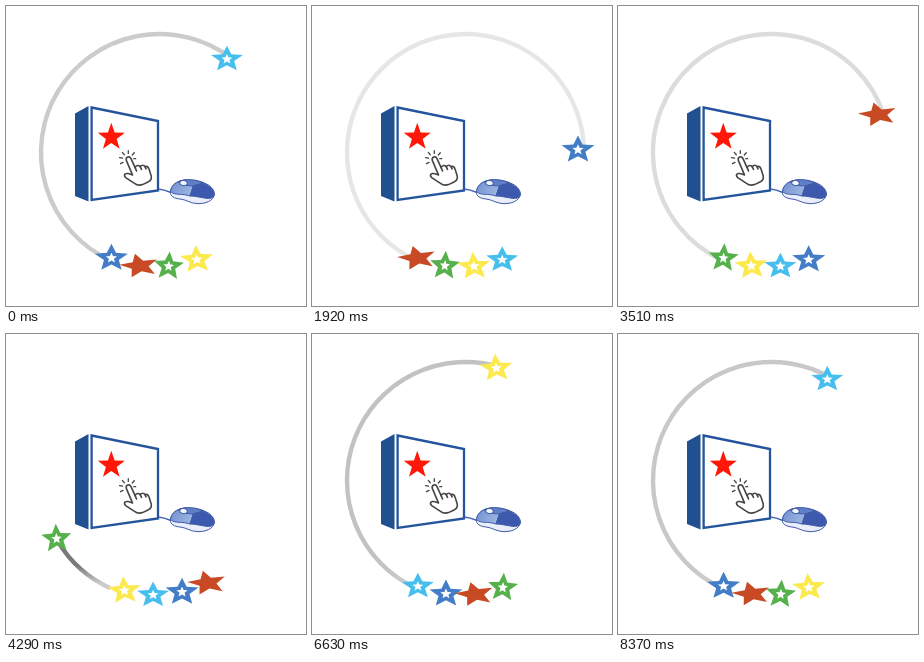
Write an HTML page that moves like this. It is 300 by 300 pixels and loops after 8.4 s.

```html
<!DOCTYPE html>
<html lang="en">
<head>
<meta charset="utf-8">
<title>Star carousel</title>
<style>
  html, body { margin: 0; width: 100%; height: 100%; overflow: hidden; background: #fff; }
  svg { display: block; width: 100%; height: 100%; }
</style>
</head>
<body>
<svg viewBox="0 0 300 300">
  <defs id="defs">
    <linearGradient id="shell" x2="1" y2=".4">
      <stop offset="0" stop-color="#6f8fd0"/>
      <stop offset="1" stop-color="#9db4e2"/>
    </linearGradient>
  </defs>

  <g id="trails" fill="none" stroke-width="4.400"/>

  <!-- box -->
  <path d="M69 107.500 82.500 100V195.500L69 190Z" fill="#20508f"/>
  <path d="M85.600 101.500 152 115V184.500L85.600 194Z" fill="#fff" stroke="#24559c" stroke-width="2.300"/>
  <path id="badge" fill="#ff1808" transform="translate(105.300 131.200)"/>

  <!-- hand -->
  <g transform="translate(0 -.6)" fill="none" stroke="#454545" stroke-width="1.600" stroke-linecap="round" stroke-linejoin="round">
    <path fill="#fff" d="M126.500 169.500 120.300 155Q119.700 152.300 121.800 151.600 124 151 125 153.200L129 162Q131.500 158.700 134.200 161.200 136.800 158.600 139 161.200 142 160 143.200 164.200L145.200 170.500Q146 174.500 142.500 176.300L136.500 179.200Q132 180.700 128.500 178L119.700 172.300Q117.700 170.500 119 168.600 120.500 167.200 126.500 169.500Z"/>
    <path d="M129 162 130.500 165.500M134.200 161.200 135.500 164M139 161.200 140 163.500"/>
    <path stroke-width="1.300" d="M114.500 158.300 117 157M113.500 152.300 116.500 152.800M116.300 147 118.300 149.300M122.300 145.300V148M128.300 147.300 126.300 149.600M129.700 153.300 127.800 153.300"/>
  </g>

  <!-- mouse -->
  <path d="M152 183Q158 183.500 165 186.500" fill="none" stroke="#3e62ae" stroke-width="1.500"/>
  <g stroke="#3f5ca6" stroke-width="1">
    <path fill="#e9eefa" d="M164.500 186C165 179 171 174.500 180 174 192 173.500 208 178 208.300 188 208 195 199 198 191 197.600 184 197.300 180 193.500 174 193 168 192.500 164 190 164.500 186Z"/>
    <path fill="url(#shell)" d="M164.500 185.500C165 179 171 174.500 180 174L188 178 184 190C176 187 169 190 164.500 185.500Z"/>
    <path fill="#3c59ae" d="M188 178C191 175.500 194 175 197 177 204 180 208.500 184 208.300 189 206 196 194 190 184 190Z"/>
    <path fill="#5f7fc6" d="M172 176C178 172.500 190 173 197 177L188 179.500Q181 181 172 176Z"/>
    <ellipse cx="177.500" cy="177" rx="3.800" ry="2.500" fill="#f4f7ff" transform="rotate(10 177.500 177)"/>
  </g>

  <g id="stars"/>
</svg>
<script>
const LOOP = 8400, STEP = LOOP / 5;
const FIRST = -157.4, GAP = 14.4, SWEEP = 360 - 3 * GAP;
const TAIL = .2;

// Width, height, tilt in the queue and in flight
const STARS = [
  { color: '#447dc7', w: 33, h: 26, rest: 0, fly: 0, hole: true },
  { color: '#c84a24', w: 38.500, h: 22.500, rest: -13, fly: -13 },
  { color: '#56b04b', w: 30, h: 27, rest: 4, fly: -6, hole: true },
  { color: '#fbe94e', w: 33, h: 26, rest: -4, fly: -4, hole: true },
  { color: '#46bfee', w: 32, h: 24.500, rest: 0, fly: 0, hole: true }
];

// Time in ms and share of the flight covered
const FLIGHT = [
  [200, 0], [500, .02], [930, .115], [1110, .213], [1590, .551],
  [1920, .779], [2250, .922], [2610, .982], [2860, 1]
];

const clamp = (x, lo = 0, hi = 1) => Math.min(hi, Math.max(lo, x));
const rad = deg => deg * Math.PI / 180;
const ease = x => x < .5 ? 2 * x * x : 1 - 2 * (1 - x) ** 2;

function slope(i) {
  if (i === 0 || i === FLIGHT.length - 1) return 0;
  const [a, b] = [FLIGHT[i - 1], FLIGHT[i + 1]];
  return (b[1] - a[1]) / (b[0] - a[0]);
}

function flight(u) {
  if (u <= FLIGHT[0][0]) return 0;
  const i = FLIGHT.findIndex(k => k[0] > u) - 1;
  if (i < 0) return 1;
  const [t0, p0] = FLIGHT[i], [t1, p1] = FLIGHT[i + 1];
  const d = t1 - t0, s = (u - t0) / d, r = 1 - s;
  return p0 * (1 + 2 * s) * r * r + slope(i) * d * s * r * r
       + p1 * s * s * (3 - 2 * s) - slope(i + 1) * d * s * s * r;
}

function point(deg, cx, cy, r) {
  return [cx + r * Math.sin(rad(deg)), cy - r * Math.cos(rad(deg))];
}

function starPath(w, h, tilt = 0, inner = .45) {
  const pts = [];
  for (let i = 0; i < 10; i++) {
    const [x, y] = point(i * 36 + tilt, 0, 0, i % 2 ? inner : 1);
    pts.push((x * w / 1.902).toFixed(2) + ' ' + (y * h / 1.809).toFixed(2));
  }
  return 'M' + pts.join('L') + 'Z';
}

function add(parent, tag, attrs = {}) {
  const el = document.createElementNS('http://www.w3.org/2000/svg', tag);
  for (const k in attrs) el.setAttribute(k, attrs[k]);
  return parent.appendChild(el);
}

const byId = id => document.getElementById(id);
byId('badge').setAttribute('d', starPath(27, 26, 0, .4));

STARS.forEach((s, i) => {
  const fade = add(byId('defs'), 'linearGradient', {
    id: 'fade' + i, gradientUnits: 'userSpaceOnUse', x1: 0, y1: 250, x2: 0, y2: 232
  });
  s.tail = add(fade, 'stop', { offset: 0 });
  add(fade, 'stop', { offset: 1 });
  s.trail = add(byId('trails'), 'path', { stroke: `url(#fade${i})` });
  s.group = add(byId('stars'), 'g');
  s.body = add(s.group, 'path', { fill: s.color });
  if (s.hole) s.core = add(s.group, 'path', { fill: '#fff' });
});

function drawTrail(s, u, angle) {
  const start = FIRST + 2;
  const alpha = clamp((2150 - u) * .00043, 0, .7);
  if (angle <= start || !alpha) return s.trail.setAttribute('opacity', 0);
  const [x0, y0] = point(start, 153.5, 146.5, 118.5);
  const [x1, y1] = point(angle, 153.5, 146.5, 118.5);
  const large = angle - start > 180 ? 1 : 0;
  s.trail.setAttribute('d', `M${x0} ${y0}A118.5 118.5 0 ${large} 1 ${x1} ${y1}`);
  s.trail.setAttribute('opacity', alpha);
  s.tail.setAttribute('stop-opacity', clamp(TAIL / alpha));
}

function draw(time) {
  STARS.forEach((s, i) => {
    const u = (time - i * STEP + LOOP) % LOOP;
    const p = flight(u);
    let angle = FIRST + SWEEP * p;
    for (let k = 2; k < 5; k++) angle += GAP * ease(clamp((u - k * STEP - 65) / STEP));

    const lift = clamp(2 * Math.sin(Math.PI * p));
    const tilt = s.rest + (s.fly - s.rest) * lift;
    const [x, y] = point(angle, 150, 145, 116);
    s.group.setAttribute('transform', `translate(${x} ${y})`);
    s.body.setAttribute('d', starPath(s.w, s.h, tilt));
    if (s.core) s.core.setAttribute('d', starPath(s.w * .34, s.h * .38, tilt));
    drawTrail(s, u, angle);
  });
}

function tick() {
  draw(Math.floor(performance.now() / 30) * 30 % LOOP);
  requestAnimationFrame(tick);
}
tick();
</script>
</body>
</html>
```
